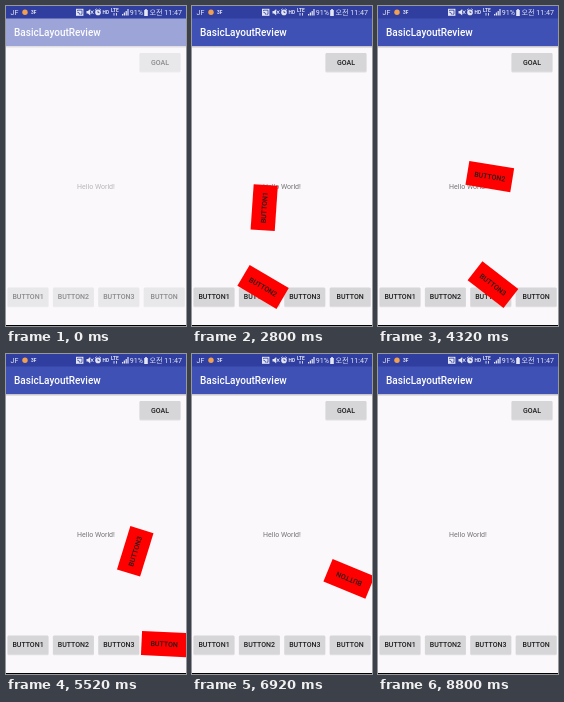
These frames come from a looping animation (180x320 px, 9000 ms). An HTML page:

```html
<!DOCTYPE html>
<html lang="ko">
<head>
<meta charset="utf-8">
<title>BasicLayoutReview</title>
<style>
  html, body { margin: 0; width: 100%; height: 100%; overflow: hidden; background: #faf8fb; }
  svg { display: block; width: 100%; height: 100%; }
  text { font-family: Roboto, "Noto Sans CJK KR", "Noto Sans CJK", sans-serif; }
  .label { font-size: 7px; font-weight: 500; text-anchor: middle; fill: #1c1c1c; }
  .status { font-size: 7.1px; fill: #e4e6f4; }
  .tiny { font-size: 4.8px; font-weight: 700; fill: #e4e6f4; }
  .icon { fill: none; stroke: #e4e6f4; stroke-width: .9; }
  .solid { fill: #e4e6f4; }
  .cut { fill: none; stroke: #303f9f; stroke-width: .8; }
</style>
</head>
<body>
<svg viewBox="0 0 180 320">
  <defs>
    <linearGradient id="shade" x2="0" y2="1">
      <stop stop-color="#000" stop-opacity=".25"/>
      <stop offset="1" stop-color="#000" stop-opacity="0"/>
    </linearGradient>
  </defs>
  <rect width="180" height="320" fill="#faf8fb"/>
  <g id="screen">
    <rect y="40" width="180" height="2.5" fill="url(#shade)"/>
    <rect y="12" width="180" height="28" fill="#3f51b5"/>
    <text x="8" y="29.7" font-size="10" font-weight="500" fill="#fff">BasicLayoutReview</text>
    <text x="90" y="182.6" font-size="7" text-anchor="middle" fill="#757575">Hello World!</text>
    <g id="buttons"></g>
  </g>
  <g id="flyers"></g>
  <rect y="319" width="180" height="1"/>

  <rect width="180" height="12.5" fill="#303f9f"/>
  <text class="status" x="4.5" y="9">JF</text>
  <circle cx="19" cy="6.2" r="2.7" fill="#f0a050"/>
  <text class="tiny" x="25" y="8">3F</text>
  <path class="solid" d="M70 2.8h7.4v7H70z"/>
  <path class="cut" d="M71.5 5V4.2h4.5v4h-1.5M71.3 6.2a2.4 2.4 0 0 1 2.4 2.4"/>
  <path class="solid" d="M80.5 5h1.5l2.2-2v6.6l-2.2-2h-1.5z"/>
  <path class="icon" d="M84.8 4.5l2.6 3.4m0-3.4l-2.6 3.4"/>
  <circle class="solid" cx="92" cy="6.4" r="2.8"/>
  <path class="cut" d="M92 4.8v1.8h1.4"/>
  <path class="icon" d="M89 4.2l1.6-1.4M95 4.2l-1.6-1.4"/>
  <text class="tiny" x="96.6" y="8">HD</text>
  <text class="tiny" x="105" y="6.2">LTE</text>
  <path class="icon" d="M108 7v2.6m2.5-2.6v2.6"/>
  <path class="solid" d="M116 9.5h1.2V8H116zm1.8 0h1.2V6.5h-1.2zm1.8 0h1.2V5h-1.2zm1.8 0h1.2V3h-1.2z"/>
  <text class="status" x="123.8" y="9" textLength="">91%</text>
  <path class="solid" d="M138.2 4h1v-1h1.6v1h1v6h-3.6z"/>
  <text class="status" x="176" y="9" text-anchor="end">오전 11:47</text>
</svg>
<script>
const LOOP = 9000, FLIGHT = 2980, SPIN = 720, FADE = 160;
const GOAL = [154, 56.2], ROW = 290.9;
const keys = [
  { name: "BUTTON1", x: 22, start: 962 },
  { name: "BUTTON2", x: 67.4, start: 2186 },
  { name: "BUTTON3", x: 112.8, start: 3638 },
  { name: "BUTTON", x: 158.2, start: 5340 }
];
const byId = id => document.getElementById(id);

function add(parent, tag, attrs, text = "") {
  const el = document.createElementNS("http://www.w3.org/2000/svg", tag);
  for (const k in attrs) el.setAttribute(k, attrs[k]);
  el.textContent = text;
  return parent.appendChild(el);
}

function box(parent, w, h, style) {
  return add(parent, "rect", { x: -w / 2, y: -h / 2, width: w, height: h, ...style });
}

function button(name, x, y) {
  const g = add(byId("buttons"), "g", { transform: `translate(${x} ${y})` });
  box(g, 41.2, 19.2, { rx: 1.2, fill: "#000", opacity: .1, transform: "translate(0 .7)" });
  box(g, 40.6, 18.6, { rx: 1, fill: "#d6d6d8" });
  add(g, "text", { class: "label", y: 2.5 }, name);
}

button("GOAL", ...GOAL);
for (const k of keys) {
  button(k.name, k.x, ROW);
  k.el = add(byId("flyers"), "g", {});
  box(k.el, 45.4, 24.2, { fill: "#f00" });
  add(k.el, "text", { class: "label", y: 2.5 }, k.name);
}

function draw(now) {
  const t = now % LOOP;
  byId("screen").setAttribute("opacity", Math.min(1, .5 + .5 * t / FADE));
  for (const k of keys) {
    const u = (t - k.start) / FLIGHT;
    const p = u * u; // accelerating flight
    const x = k.x + (GOAL[0] - k.x) * p, y = ROW + (GOAL[1] - ROW) * p;
    k.el.setAttribute("visibility", u >= 0 && u < 1 ? "visible" : "hidden");
    k.el.setAttribute("transform", `translate(${x} ${y}) rotate(${SPIN * p})`);
  }
}

let begin;
function tick(now) {
  begin ??= now;
  draw(now - begin);
  requestAnimationFrame(tick);
}
draw(0);
requestAnimationFrame(tick);
</script>
</body>
</html>
```
